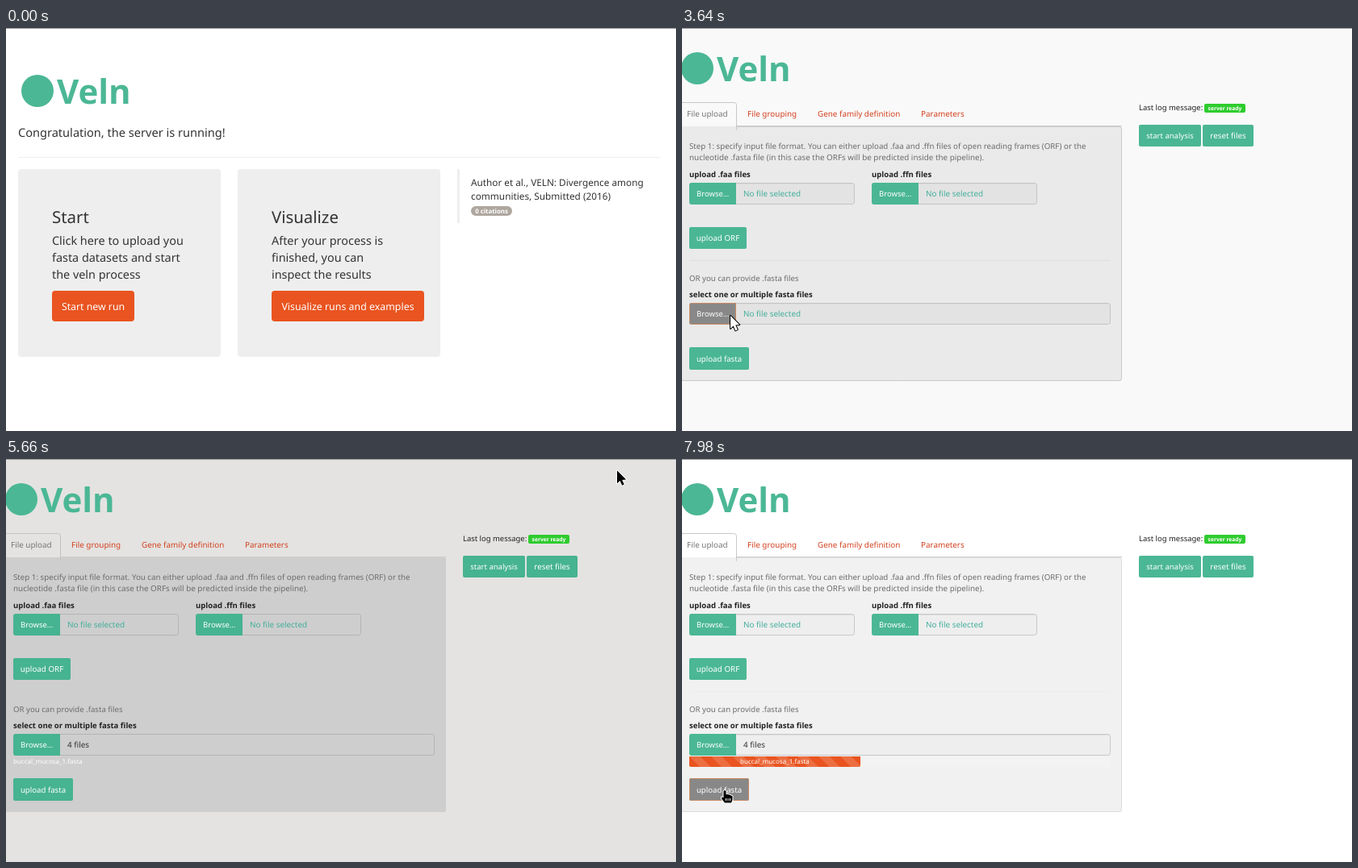
Recreate the animation shown at these times as an HTML page with a canvas. Size 830 by 500 pixels, loop 8000 ms.

```html
<!DOCTYPE html>
<html lang="en">
<head>
<meta charset="utf-8">
<title>Upload walkthrough</title>
<style>
  html, body { margin: 0; width: 100%; height: 100%; overflow: hidden; background: #fff; }
  canvas { display: block; }
</style>
</head>
<body>
<canvas id="stage" width="830" height="500"></canvas>
<script>
const ctx = document.getElementById('stage').getContext('2d');
const LOOP = 8000;
const FONT = '"Noto Sans", "Open Sans", sans-serif';
const TEAL = '#4bb795', ORANGE = '#e95420', INK = '#333333';
const FILES = [
  ['buccal_mucosa_1.fasta', '28.9 MB', '16:17'],
  ['buccal_mucosa_2.fasta', '6.6 MB', '16:17'],
  ['posterior_fornix_1.fasta', '5.4 MB', '16:17'],
  ['posteror_fornix_2.fasta', '11.3 MB', '16:18']
];

const START_BUTTON = [57, 326, 102, 38];
const BROWSE_FASTA = [9, 341, 58, 27];
const UPLOAD_FASTA = [9, 396, 74, 28];

// Keys are [time, value, ...]; the pointer eases between them.
const POINTER = [
  [1120, 272, 488], [1400, 190, 410], [1680, 127, 344],
  [2890, 127, 344], [3200, 92, 350], [3560, 57, 357],
  [3870, 75, 357], [4250, 150, 150], [4480, 205, 31], [4700, 205, 31],
  [4960, 260, 106], [5100, 260, 106], [5420, 838, -24],
  [5620, 790, -10], [5740, 668, 80], [6100, 380, 270], [6420, 112, 424],
  [6540, 74, 428], [6700, 54, 415], [6900, 53, 411]
];
const DIM = [[3600, 0], [3760, 0.8], [5620, 1], [5740, 1], [6020, 0]];
const PROGRESS = [[5740, 0], [6700, 58], [7260, 120], [7980, 212], [8000, 214]];

const smooth = u => u * u * (3 - 2 * u);

function track(keys, t, ease = u => u) {
  if (t <= keys[0][0]) return keys[0].slice(1);
  for (let i = 1; i < keys.length; i++) {
    const a = keys[i - 1], b = keys[i];
    if (t < b[0]) {
      const u = ease((t - a[0]) / (b[0] - a[0]));
      return a.slice(1).map((v, j) => v + (b[j + 1] - v) * u);
    }
  }
  return keys[keys.length - 1].slice(1);
}

function mix(from, to, k) {
  const part = (hex, i) => parseInt(hex.slice(1 + i * 2, 3 + i * 2), 16);
  const rgb = [0, 1, 2].map(i => Math.round(part(from, i) + (part(to, i) - part(from, i)) * k));
  return `rgb(${rgb})`;
}

const inside = ([x, y], [l, t, w, h]) => x >= l && x < l + w && y >= t && y < t + h;

function fill(x, y, w, h, color) {
  ctx.fillStyle = color;
  ctx.fillRect(x, y, w, h);
}

function box(x, y, w, h, radius, color, border) {
  ctx.beginPath();
  ctx.roundRect(x, y, w, h, radius);
  ctx.fillStyle = color;
  ctx.fill();
  if (!border) return;
  ctx.beginPath();
  ctx.roundRect(x + 0.5, y + 0.5, w - 1, h - 1, radius);
  ctx.strokeStyle = border;
  ctx.lineWidth = 1;
  ctx.stroke();
}

function text(str, x, y, size, color = INK, weight = 400, align = 'left') {
  ctx.font = `${weight} ${size}px ${FONT}`;
  ctx.fillStyle = color;
  ctx.textAlign = align;
  ctx.fillText(str, x, y);
}

function button([x, y, w, h], label, size, color, border) {
  box(x, y, w, h, size > 11 ? 4 : 2, color, border);
  text(label, x + w / 2, y + h / 2 + size * 0.37, size, '#fff', 400, 'center');
}

function logo(x, y) {
  ctx.beginPath();
  ctx.arc(x + 21, y + 25, 20, 0, Math.PI * 2);
  ctx.fillStyle = TEAL;
  ctx.fill();
  text('Veln', x + 45, y + 41, 42, TEAL, 700);
}

function startPage(t, pointer) {
  fill(0, 0, 830, 500, '#fff');
  logo(18, 53);
  text('Congratulation, the server is running!', 15, 135, 14.57);
  fill(15, 160, 795, 1, '#eeeeee');

  const card = (x, title, lines) => {
    box(x, 175, 251, 233, 4, '#eeeeee');
    text(title, x + 42, 242, 20.4);
    lines.forEach((line, i) => text(line, x + 42, 269 + i * 21, 14.4));
  };
  card(15, 'Start', ['Click here to upload you', 'fasta datasets and start', 'the veln process']);
  card(287, 'Visualize', ['After your process is', 'finished, you can', 'inspect the results']);

  const hover = inside(pointer, START_BUTTON);
  const pressed = t >= 1940 && t < 2030;
  button(START_BUTTON, 'Start new run', 12.3,
    pressed ? '#c9400a' : hover ? '#ff5500' : ORANGE, hover && '#8a1500');
  button([329, 326, 189, 38], 'Visualize runs and examples', 12.4, ORANGE);

  fill(559, 175, 3, 67, '#eeeeee');
  text('Author et al., VELN: Divergence among', 576, 196, 11.75);
  text('communities, Submitted (2016)', 576, 213, 11.8);
  box(576, 221, 51, 12, 6, '#aea79f');
  text('0 citations', 601.5, 229.5, 7.8, '#fff', 700, 'center');
}

function fileInput(x, y, w, label, value, look, hover) {
  text(label, x, y - 7, 9.55, '#222', 700);
  box(x, y, w, 27, 3, look.field, look.line);
  fill(x + 59, y + 1, w - 61, 1, look.shade);
  box(x, y, 58, 27, [3, 0, 0, 3], hover ? '#888888' : look.teal, hover && '#c98a62');
  text('Browse…', x + 9, y + 17, 9.5, '#fff');
  const empty = value === 'No file selected';
  text(value, x + 67, y + 17, 9.9, empty ? '#42ae9b' : INK);
}

function progressBar(t) {
  const width = track(PROGRESS, t)[0];
  const period = 26.7;
  ctx.save();
  ctx.beginPath();
  ctx.roundRect(9, 369, width, 13, [0, 0, 2, 2]);
  ctx.clip();
  fill(9, 369, width, 13, ORANGE);
  ctx.fillStyle = 'rgba(255,255,255,0.15)';
  const shift = period * (1 - (t % 2000) / 2000);
  for (let x = 9 - period * 2 + shift; x < 9 + width; x += period) {
    ctx.beginPath();
    ctx.moveTo(x, 369);
    ctx.lineTo(x + period / 2, 369);
    ctx.lineTo(x + period / 2 + 13, 382);
    ctx.lineTo(x + 13, 382);
    ctx.fill();
  }
  ctx.restore();
  text(FILES[0][0], 9 + Math.max(0, (width - 86) / 2), 378, 8, '#fff');
}

function uploadPage(t, pointer) {
  const k = track(DIM, t)[0];
  const bg = mix('#ffffff', '#e4e3e1', k);
  const panel = mix('#f1f1f1', '#cecece', k);
  const chosen = t >= 5620;
  const look = {
    teal: mix(TEAL, '#46b391', k),
    field: mix(chosen ? '#eeeeee' : '#e9e9e9', '#cecece', k),
    line: mix('#c8c8c8', '#b4b4b4', k),
    shade: mix('#dedede', '#cecece', k)
  };
  const edge = mix(chosen ? '#dddddd' : '#c8caca', '#cecece', k);

  fill(0, 0, 830, 500, bg);
  logo(-2, 25);

  box(-10, 122, 555, 316, 3, panel, edge);
  fill(68, 121, 477, 1, mix('#cccccc', '#cecece', k));
  box(-10, 92, 78, 35, [0, 3, 0, 0], bg, mix('#c8c8c8', '#c2c2c0', k));
  fill(0, 122, 67, 6, panel);
  text('File upload', 6, 110, 9.9, '#777777');
  [['File grouping', 81], ['Gene family definition', 168], ['Parameters', 296]]
    .forEach(([label, x]) => text(label, x, 110, 9.9, '#d3401f'));

  const soft = '#6c6c6c';
  text('Step 1: specify input file format. You can either upload .faa and .ffn files of open reading frames (ORF) or the', 9, 150, 9.72, soft);
  text('nucleotide .fasta file (in this case the ORFs will be predicted inside the pipeline).', 9, 164, 9.85, soft);

  fileInput(9, 192, 205, 'upload .faa files', 'No file selected', look);
  fileInput(235, 192, 205, 'upload .ffn files', 'No file selected', look);
  button([9, 247, 71, 27], 'upload ORF', 9.8, look.teal);
  fill(9, 288, 522, 1, mix(chosen ? '#ececec' : '#e2e2e2', '#cecece', k));
  text('OR you can provide .fasta files', 9, 314, 9.62, soft);
  fileInput(9, 341, 522, 'select one or multiple fasta files',
    chosen ? '4 files' : 'No file selected', look, inside(pointer, BROWSE_FASTA));

  if (chosen) {
    fill(9, 369, 522, 13, mix('#f3f3f3', '#cecece', k));
    progressBar(t);
  }
  const hover = inside(pointer, UPLOAD_FASTA);
  button(UPLOAD_FASTA, 'upload fasta', 9.65, hover ? '#888888' : look.teal, hover && '#c98a62');

  text('Last log message:', 566, 102, 9.45, '#222');
  box(647, 94, 51, 11, 2, '#2ecc2e');
  text('server ready', 672.5, 102, 6.7, '#fff', 700, 'center');
  button([566, 120, 77, 27], 'start analysis', 9.5, look.teal);
  button([645, 120, 63, 27], 'reset files', 9.8, look.teal);
}

function fileIcon(x, y) {
  box(x, y, 13, 16, 1, '#f4f4f2', '#8d8f8b');
  for (let i = 0; i < 5; i++) fill(x + 3, y + 3 + i * 2, i ? 8 : 5, 1, '#a9aba7');
}

function fileDialog(t) {
  const ink = '#2e3436', muted = '#8b8e8f';
  const selected = t < 4480 ? 0 : t < 4960 ? 1 : 4;
  fill(0, 0, 830, 500, '#fff');
  fill(0, 0, 117, 479, '#f1f1f1');
  fill(117, 0, 1, 479, '#a1a1a1');
  ['Home', 'Documents', 'Downloads', 'Music', 'Pictures', 'Videos']
    .forEach((name, i) => text(name, 5, 7 + i * 38, 13.5, ink));
  fill(0, 215, 117, 1, '#cccccc');
  text('Other Locati…', 5, 244, 13.4, ink);

  text('Name', 124, 5, 13.3, muted, 700);
  text('Size', 721, 5, 13.3, muted, 700);
  text('Modified', 789, 5, 13.3, muted, 700);
  fill(713, 0, 1, 13, '#d8d8d8');
  fill(782, 0, 1, 13, '#d8d8d8');
  ctx.beginPath();
  ctx.moveTo(694, -1);
  ctx.lineTo(704, -1);
  ctx.lineTo(699, 4);
  ctx.fillStyle = '#777';
  ctx.fill();

  FILES.forEach(([name, size, time], i) => {
    const y = 14 + i * 26;
    const color = i < selected ? '#fff' : ink;
    if (i < selected) fill(118, y, 712, 26, '#4a90d9');
    fileIcon(127, y + 5);
    text(name, 150, y + 18, 13.9, color);
    text(size, 722, y + 18, 13.9, color);
    text(time, 791, y + 18, 13.9, color);
  });

  fill(0, 479, 830, 21, '#e9e9e9');
  fill(0, 479, 830, 1, '#a1a1a1');
  box(760, 486, 90, 34, 3, '#f3f3f3', '#a8a8a8');
  text('*.fasta', 771, 507, 13.9, ink);
}

function outline(points, x, y, color, border) {
  ctx.beginPath();
  points.forEach(([px, py]) => ctx.lineTo(x + px, y + py));
  ctx.closePath();
  ctx.lineJoin = 'round';
  ctx.lineWidth = 2;
  ctx.strokeStyle = border;
  ctx.stroke();
  ctx.fillStyle = color;
  ctx.fill();
}

const ARROW = [[0, 0], [0, 16], [3.6, 12.6], [6.2, 18.4], [8.8, 17.2], [6.2, 11.6], [11.2, 11.2]];
const HAND = [[-1.5, 1], [0, 0], [1.5, 1], [1.5, 5], [4, 5], [7, 6], [9.5, 7.5],
  [9.5, 12], [8, 15.5], [0, 15.5], [-4, 10.5], [-4, 8.5], [-1.5, 9]];

function drawPointer(t, [x, y]) {
  if (t < 1120) return;
  if (t >= 6500 && inside([x, y], UPLOAD_FASTA)) {
    outline(HAND, x, y, '#000', '#fff');
    for (let i = 0; i < 3; i++) fill(x + 1 + i * 2.5, y + 10, 1, 3, '#fff');
  } else if (t >= 2410 && t < 3720) {
    outline(ARROW, x, y, '#fff', '#000');
  } else {
    outline(ARROW, x, y, '#000', '#fff');
  }
}

function draw(now) {
  const t = now % LOOP;
  const pointer = t < 1120 ? [-50, -50] : track(POINTER, t, smooth);
  ctx.textRendering = 'geometricPrecision';
  const dialog = t >= 3720 && t < 5620;
  if (dialog) fileDialog(t);
  else {
    if (t < 2410) startPage(t, pointer);
    else uploadPage(t, pointer);
    fill(0, 0, 830, 1, '#999999');
  }
  drawPointer(t, pointer);
  requestAnimationFrame(draw);
}
requestAnimationFrame(draw);
</script>
</body>
</html>
```
